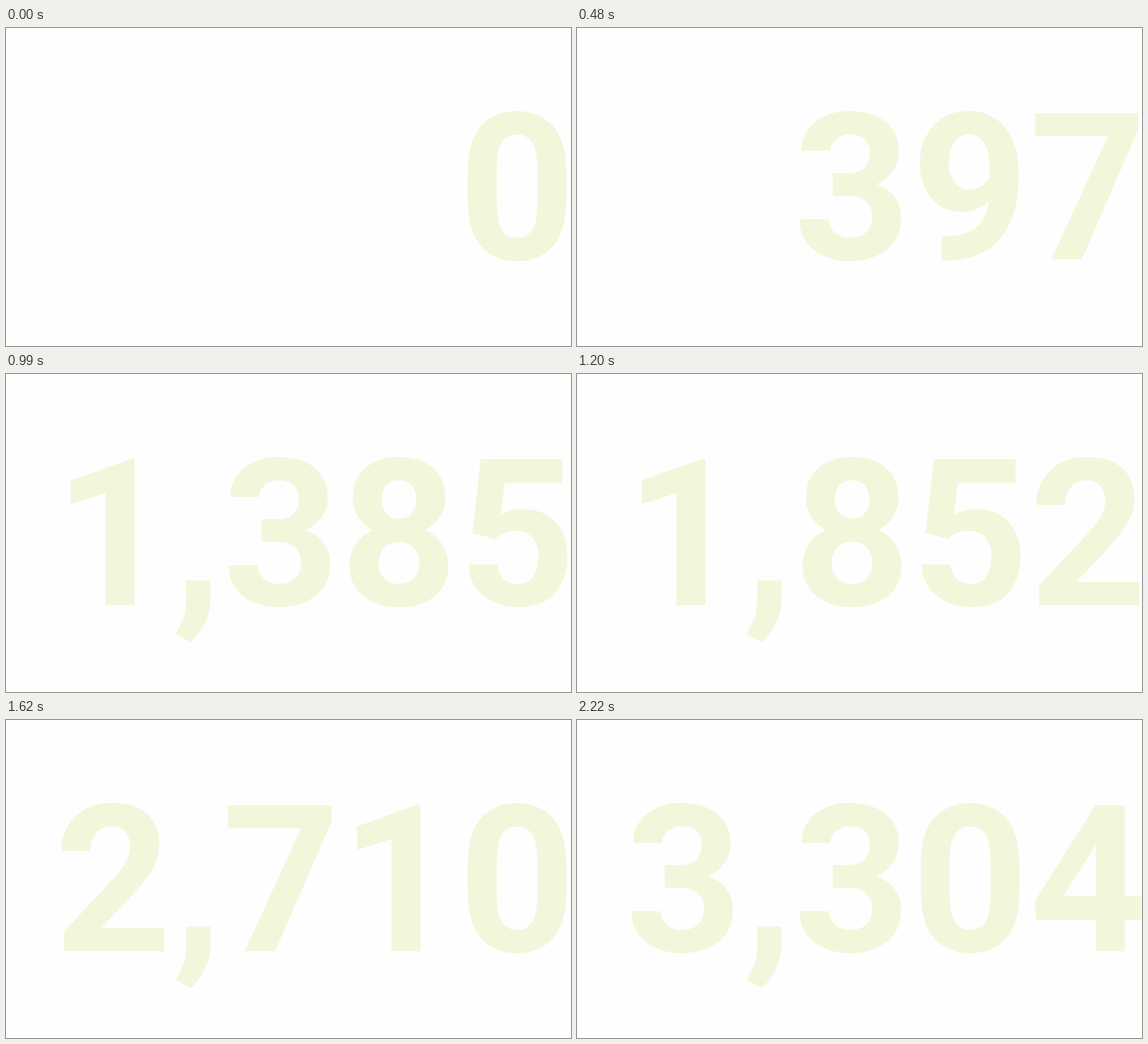
Animation, 998 px wide and 561 px high, one loop 2250 ms. Source, as an HTML page with a canvas:

```html
<!DOCTYPE html>
<html lang="en">
<head>
<meta charset="utf-8">
<title>Counter</title>
<style>
  html, body { margin: 0; height: 100%; overflow: hidden; background: #fefefe; }
  canvas { display: block; }
</style>
</head>
<body>
<canvas id="stage" width="998" height="561"></canvas>
<script>
const STEP = 30, STEPS = 75, TOTAL = 3304;
const BASELINE = 408, ZERO_RIGHT = 991.3;

const ctx = document.getElementById('stage').getContext('2d');
ctx.font = 'bold 363px Roboto, sans-serif';
ctx.textAlign = 'right';

// Right edge of the text, placed so that a final zero ends at ZERO_RIGHT
const right = ZERO_RIGHT - ctx.measureText('0').actualBoundingBoxRight;

const smoothstep = p => p * p * (3 - 2 * p);

function draw(now) {
  const step = Math.floor(now / STEP) % STEPS;
  const value = Math.round(TOTAL * smoothstep(step / (STEPS - 1)));
  ctx.fillStyle = '#fefefe';
  ctx.fillRect(0, 0, 998, 561);
  ctx.fillStyle = '#f4f6dc';
  ctx.fillText(value.toLocaleString('en-US'), right, BASELINE);
}

const start = performance.now();
function tick() {
  draw(performance.now() - start);
  requestAnimationFrame(tick);
}
tick();
</script>
</body>
</html>
```
